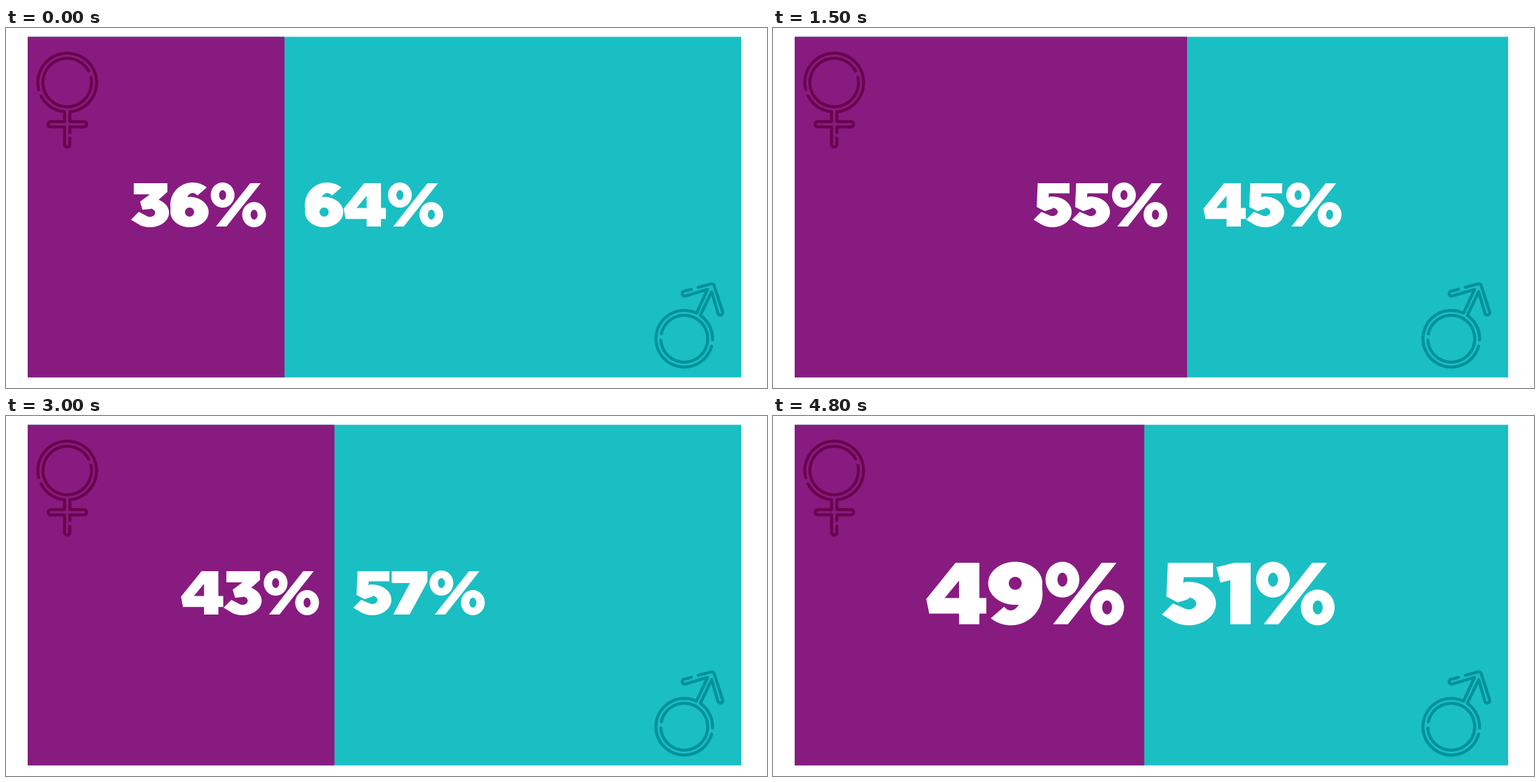
These frames come from a looping animation (1088x515 px, 9800 ms). A matplotlib script:

```python
import numpy as np
import matplotlib.pyplot as plt
from matplotlib.animation import FuncAnimation
from matplotlib.patches import PathPatch, Rectangle
from matplotlib.path import Path
from matplotlib.transforms import Affine2D

W, H, DPI = 1088, 515, 100
STEP, LOOP, HOLD = 100, 9800, 300
PURPLE, TEAL = "#881b80", "#1abfc3"
PLUM, DEEP = "#69034d", "#00919a"
LEFT, RIGHT, TOP, BOTTOM = 31, 1051, 12.6, 499.8
SHARES = [36, 50, 42, 79, 28, 55, 22, 33, 74, 69, 43, 53, 77, 36, 42, 32, 49]


def arc(cx, cy, rx, ry, a, b):
    t = np.radians(np.linspace(a, b, 90))
    return np.column_stack([cx + rx * np.cos(t), cy + ry * np.sin(t)])


# ---- heavy numerals: baseline 0, cap height 62 ----

def poly(*pts, hole=False):
    """Closed shape; solids wind one way, holes the other."""
    xy = np.array(pts, float)
    x, y = xy.T
    area = np.sum(x * np.roll(y, -1) - y * np.roll(x, -1))
    if (area < 0) != hole:
        xy = xy[::-1]
    return Path(np.vstack([xy, xy[:1]]), closed=True)


def join(*parts):
    return Path(np.vstack([p.vertices for p in parts]),
                np.concatenate([p.codes for p in parts]))


def ring(cx, cy, rx, ry, hx, hy, drop=0):
    return join(poly(*arc(cx, cy, rx, ry, 0, 360)),
                poly(*arc(cx, cy + drop, hx, hy, 0, 360), hole=True))


def band(cx, cy, rx, ry, hx, hy, a, b):
    return poly(*arc(cx, cy, rx, ry, a, b), *arc(cx, cy, hx, hy, b, a))


def bowl(top):
    """Open lower bowl with a slanted tip, shared by 3 and 5."""
    cy = top / 2 - 0.5
    return join(band(27, cy, 27.4, top / 2 + 0.5, 7.5, 5.9, 100, -125),
                poly((0, 9.8), (11.2, 21), (22.7, cy - 4.8), (11.3, 3)))


zero = ring(30, 31, 30, 32, 8.5, 15.5)
one = poly((14, 0), (14, 44.5), (4, 42), (0, 57.5), (18, 62), (34.5, 62),
           (34.5, 0))
two = join(band(25.5, 42.5, 25, 20.5, 4.5, 4.7, 135, -40),
           poly((1, 46.5), (14, 37.5), (22.3, 45.8), (7.8, 57)),
           poly((44.7, 29.3), (28, 16.5), (53, 16.5), (53, 0), (0, 0),
                (0, 14), (28.9, 39.5)))
three = join(bowl(40.5), poly((4, 62), (52, 62), (52, 49.5), (38, 37), (27, 25),
                              (16.5, 24), (13, 35.5), (27, 46), (4, 46)))
four = join(poly((0, 25.5), (29.5, 62), (53.5, 62), (53.5, 26.5), (60.5, 26.5),
                 (60.5, 10.8), (53.5, 10.8), (53.5, 0), (33, 0), (33, 10.8),
                 (3, 10.8)),
            poly((33, 26.5), (33, 44), (18.5, 26.5), hole=True))
five = join(bowl(42.8), poly((6, 62), (51.5, 62), (51.5, 47.5), (22, 47.5),
                             (21.5, 41.5), (28, 42.6), (27, 25.5), (16, 22),
                             (4.5, 28)))
six = join(ring(27.5, 20.7, 27.3, 21.7, 6.5, 6.5),
           band(32, 31, 32, 32, 10.5, 17, 51, 200))
seven = poly((0, 62), (51, 62), (51, 47), (25.5, 0), (2, 0), (26, 45), (0, 45))
eight = join(ring(27.5, 46, 25.5, 17, 6, 5, -2),
             ring(27.5, 17.5, 27.5, 18.5, 7, 5.5, 1))
nine = six.transformed(Affine2D().rotate_deg(180).translate(54.8, 62))
percent = join(poly((7.5, 0), (56.5, 62), (71.5, 62), (22.5, 0)),
               ring(17, 45, 17, 18, 5, 7), ring(62, 17, 17, 18, 5, 7))
DIGITS = [zero, one, two, three, four, five, six, seven, eight, nine]
ROUND, OPEN = "0689", "1%"


def set_text(text, x, size, base):
    """Outline of a label whose ink begins at x."""
    pen, parts = 0, []
    for ch in text:
        glyph = percent if ch == "%" else DIGITS[int(ch)]
        box = glyph.get_extents()
        if parts:
            pen += 1.3 * (ch in ROUND) + 2.5 * (ch == "%")
        parts.append(glyph.transformed(Affine2D().translate(pen - box.x0, 0)))
        pen += box.width + 0.5 + 2.5 * (ch in OPEN)
    return join(*parts).transformed(
        Affine2D().scale(size, -size).translate(x, base))


# ---- icons ----

def stroke(color, *parts):
    x, y = np.vstack(parts).T
    ax.plot(x, y, color=color, lw=4.3 * 72 / DPI, zorder=2,
            solid_capstyle="round", solid_joinstyle="round")


def turn(cx, cy, r, a, b):
    return arc(cx, cy, r, r, a, b)


def female(color, cx, cy, r=42, g=3.8):
    """g is half the gap between the two lines of a limb."""
    bar = cy + 59.7
    foot = cy + 88.5
    stroke(color, turn(cx, cy, r - 7.3, -12.5, 332))
    stroke(color, turn(cx, cy, r, 166, 444.8), [(cx + g, bar - g)],
           turn(cx + 24, bar, g, -90, 90), [(cx + g, bar + g), (cx + g, bar + 12)])
    stroke(color, [(cx + g, foot - 9)], turn(cx, foot, g, 0, 180),
           [(cx - g, bar + g)], turn(cx - 23.5, bar, g, 90, 270),
           [(cx - g, bar - g)], turn(cx, cy, r, 95.2, 153))


def male(color, cx, cy, r=40.5, g=3.6):
    stroke(color, turn(cx, cy, r - 7, 192, 537))
    stroke(color, turn(cx, cy, r, 15, 295.6), [(cx + 33.3, cy - 70.5)],
           turn(cx + 0.6, cy - 64.5, g, 74, 254), [(cx + 10.3, cy - 70.7)])
    stroke(color, [(cx + 19.8, cy - 73.5)], turn(cx + 39.3, cy - 75, g, 254, 341),
           turn(cx + 51.5, cy - 37.5, g, -19, 161), [(cx + 39.2, cy - 67.3)],
           turn(cx, cy, r, -55.5, 2.5))


# ---- stage ----

fig = plt.figure(figsize=(W / DPI, H / DPI), dpi=DPI, facecolor="white")
ax = fig.add_axes([0, 0, 1, 1])
ax.axis("off")

men, women = [
    ax.add_patch(Rectangle((LEFT, TOP), RIGHT - LEFT, BOTTOM - TOP, fc=color,
                           lw=0, snap=False)) for color in (TEAL, PURPLE)]
female(PLUM, 87.5, 78)
male(DEEP, 969.7, 444.5)
labels = [ax.add_patch(PathPatch(one, fc="white", lw=0, zorder=3, snap=False))
          for _ in range(2)]
ax.set_xlim(0, W)
ax.set_ylim(H, 0)


def update(i):
    k = min(i * STEP // HOLD, len(SHARES) - 1)
    share = SHARES[k]
    width = (RIGHT - LEFT) * share / 100
    split = LEFT + width
    women.set_width(width)
    size, base = (1.42, 298) if k == len(SHARES) - 1 else (1, 284)
    gap = 30 - 0.3 * (share - 33)
    labels[0].set_path(set_text(f"{share}%", split - 219.5 * size, size, base))
    labels[1].set_path(set_text(f"{100 - share}%", split + gap, size, base))
    return [women, *labels]


anim = FuncAnimation(fig, update, frames=LOOP // STEP, interval=STEP,
                     repeat=True, repeat_delay=0, blit=False)
plt.show()
```
